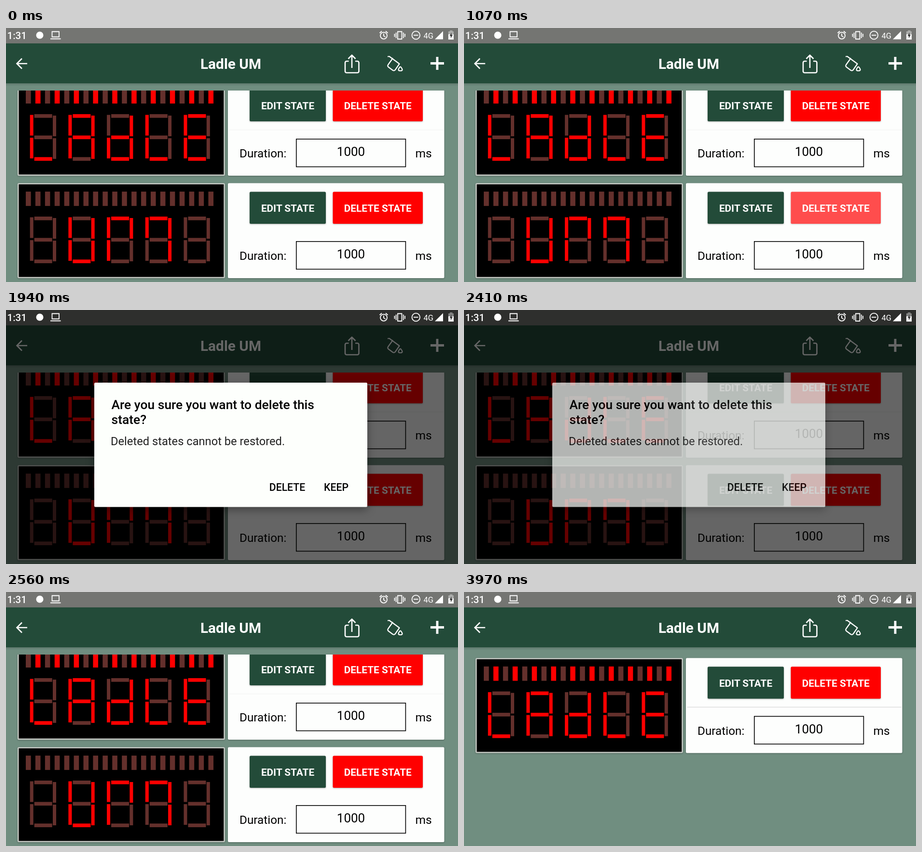
Animation of 937x528 px, one loop 4050 ms. Source, as an HTML page:

```html
<!DOCTYPE html>
<html lang="en">
<head>
<meta charset="utf-8">
<title>State list</title>
<style>
  html, body { margin: 0; width: 100%; height: 100%; overflow: hidden; background: #708e80; }
  svg { display: block; width: 937px; height: 528px; font-family: Roboto, sans-serif; }
  .bold { font-weight: 700; }
  .medium { font-weight: 500; }
  .mid { text-anchor: middle; }
  .line { fill: none; stroke: #fff; stroke-width: 2.6; stroke-linejoin: round; }
  .thin { fill: none; stroke: #fff; stroke-width: 1.8; }
  .raised { filter: drop-shadow(0 1px 1.5px rgba(0, 0, 0, .3)); }
  .off { fill: #64302c; }
  .on { fill: #f00; }

  #first, #second, #first .rule, #second .delete, #dim, #dialog {
    animation: 4050ms step-end infinite;
  }
  #first { animation-name: scroll; }
  #second { animation-name: remove; }
  #first .rule { animation-name: rule; }
  #second .delete { animation-name: press; }
  #dim { animation-name: dim; }
  #dialog { animation-name: dialog; filter: drop-shadow(0 6px 9px rgba(0, 0, 0, .35)); }

  @keyframes scroll {
    0% { transform: translateY(109.6px); }
    65.15%, 100% { transform: translateY(137.2px); }
  }
  @keyframes remove {
    0% { visibility: visible; }
    65.15%, 100% { visibility: hidden; }
  }
  @keyframes rule {
    0% { opacity: .25; }
    65.15%, 100% { opacity: 1; }
  }
  @keyframes press {
    0% { opacity: 1; }
    22.45% { opacity: .9; }
    24.4% { opacity: .75; }
    26.4% { opacity: .7; }
    28.35% { opacity: .73; }
    30.35% { opacity: .8; }
    32.05% { opacity: .92; }
    34.05%, 100% { opacity: 1; }
  }
  @keyframes dim {
    0% { opacity: 0; }
    28.35% { opacity: .17; }
    30.35% { opacity: .4; }
    32.05% { opacity: .6; }
    61.45% { opacity: .3; }
    63.2%, 100% { opacity: 0; }
  }
  @keyframes dialog {
    0% { opacity: 0; }
    28.35% { opacity: .55; }
    30.35% { opacity: .985; }
    32.05% { opacity: 1; }
    59.5% { opacity: .71; }
    61.45% { opacity: .1; }
    63.2%, 100% { opacity: 0; }
  }
</style>
</head>
<body>
<svg viewBox="0 0 937 528">
  <defs>
    <clipPath id="list"><rect y="130" width="937" height="398"/></clipPath>
    <linearGradient id="shade" x2="0" y2="1">
      <stop stop-opacity=".14"/><stop offset="1" stop-opacity="0"/>
    </linearGradient>
  </defs>

  <rect width="937" height="528" fill="#708e80"/>
  <rect y="115" width="937" height="6" fill="url(#shade)"/>
  <g clip-path="url(#list)">
    <g id="first"></g>
    <g transform="translate(0 322.5)"><g id="second"></g></g>
  </g>

  <rect width="937" height="33" fill="#747572"/>
  <rect y="32" width="937" height="83" fill="#234b39"/>
  <text class="bold mid" x="466" y="85" font-size="29.8" fill="#fff">Ladle UM</text>
  <g class="line">
    <path d="M44 74H23M33 63.5L22.500 74L33 84.500" stroke-linejoin="miter"/>
    <path d="M710.500 69H706a3 3 0 0 0-3 3v18a3 3 0 0 0 3 3h22.500a3 3 0 0 0 3-3V72a3 3 0 0 0-3-3h-4.500M717 83V56.500M709.500 64L717 56.500L724.500 64"/>
    <path d="M791 59.500l3.500-.5 21 15.500-9 13q-2 2-4.500.5l-9.500-7q-2-2-.5-4.500l10-14M817.500 80q8 9 0 9t0-9" stroke-width="2.2"/>
    <path d="M880 73.500H908M894 60V87" stroke-width="4.8"/>
  </g>

  <rect id="dim" width="937" height="528"/>

  <g fill="#fff">
    <text class="medium" x="2.500" y="22.500" font-size="20.500">1:31</text>
    <circle cx="70" cy="15" r="7.500"/>
    <path class="thin" d="M95.500 7.500h14.500v11H95.500zM92 22.500h21.500"/>
    <circle class="thin" cx="783" cy="15.800" r="7"/>
    <path class="thin" d="M783 11.500v5l3.500 2M774.500 10.500l4.500-4M791.500 10.500l-4.500-4"/>
    <path class="thin" d="M812 7.500h8.500v15.500H812zM808.700 9.500v11.500M805.500 12v6.500M823.800 9.500v11.500M827 12v6.500"/>
    <circle class="thin" cx="849.800" cy="15" r="8.300"/>
    <path class="thin" d="M845 15h9.500"/>
    <text x="865.500" y="21.500" font-size="16.500">4G</text>
    <path d="M906 6.500V23.500H889z"/>
    <path d="M920 5h5.500v2h2.500v6h-11V7h3z" opacity=".4"/>
    <path d="M917 13h11v11h-11z"/>
    <path d="M923.500 9.500l-4 7h2.500v5l4-7.500h-2.500z" fill="#333"/>
  </g>

  <g id="dialog">
    <rect x="183" y="151" width="566" height="258.500" rx="2.500" fill="#fdfffc"/>
    <g class="medium" font-size="26.400">
      <text x="218.500" y="206">Are you sure you want to delete this</text>
      <text x="218.500" y="237">state?</text>
    </g>
    <text x="217" y="281" font-size="23.700" fill="#222">Deleted states cannot be restored.</text>
    <g class="medium mid" font-size="21.200">
      <text x="583" y="376">DELETE</text>
      <text x="684.500" y="376">KEEP</text>
    </g>
  </g>
</svg>

<script>
  // Seven segments a to g: x, y, width, height inside one digit
  const upright = (x, y) => [x, y, 7, 43];
  const flat = y => [9, y, 37, 7.6];
  const segments = {
    a: flat(0), b: upright(47.3, 3), c: upright(47.3, 50), d: flat(89.3),
    e: upright(0, 49), f: upright(0, 1.5), g: flat(44.4)
  };

  const rect = (x, y, w, h, attrs) =>
    `<rect x="${x}" y="${y}" width="${w}" height="${h}" ${attrs}/>`;
  const lamp = (x, y, w, h, lit) => rect(x, y, w, h, `class="${lit ? 'on' : 'off'}"`);

  const digit = (lit, i) => Object.entries(segments).map(([name, [x, y, w, h]]) =>
    lamp(49.7 + i * 79.7 + x, 69.5 + y, w, h, lit.includes(name))).join('');

  const bars = alternate => Array.from({ length: 20 }, (_, i) =>
    lamp(41 + i * 19.92, 17.6, 10.6, 29.8, alternate && i % 2)).join('');

  const button = (name, x, w, color, label) => `<g class="${name}">
    ${rect(x, 18, w, 66.5, `rx="2.5" fill="${color}" class="raised"`)}
    <text class="bold mid" x="${x + w / 2}" y="59.5" font-size="20.8" fill="#fff">${label}</text></g>`;

  const row = (digits, alternate, rule) => `
    ${rect(25.2, 1.3, 427.4, 195, 'rx="1.5" stroke="#c5c9c4" stroke-width="2.6" class="raised"')}
    ${bars(alternate)}${digits.map(digit).join('')}
    ${rect(460, 0, 448.5, 197.5, 'rx="2.5" fill="#fdfefd" class="raised"')}
    ${button('edit', 505, 158, '#234b39', 'EDIT STATE')}
    ${button('delete', 677.5, 186.5, '#f00', 'DELETE STATE')}
    ${rule ? rect(462.5, 101.6, 444, 1.2, 'fill="#d4d4d4" class="rule"') : ''}
    <text x="484" y="159.500" font-size="24.3">Duration:</text>
    ${rect(601.8, 121.3, 226.6, 57.6, 'fill="none" stroke="#000" stroke-width="1.6"')}
    <text class="mid" x="715" y="156.500" font-size="26">1000</text>
    <text x="848.500" y="159.500" font-size="24.6">ms</text>`;

  document.getElementById('first').innerHTML =
    row(['def', 'abcefg', 'bcdeg', 'def', 'adefg'], true, true);
  document.getElementById('second').innerHTML =
    row(['', 'bcdef', 'abef', 'abcf', ''], false, false);
</script>
</body>
</html>
```
